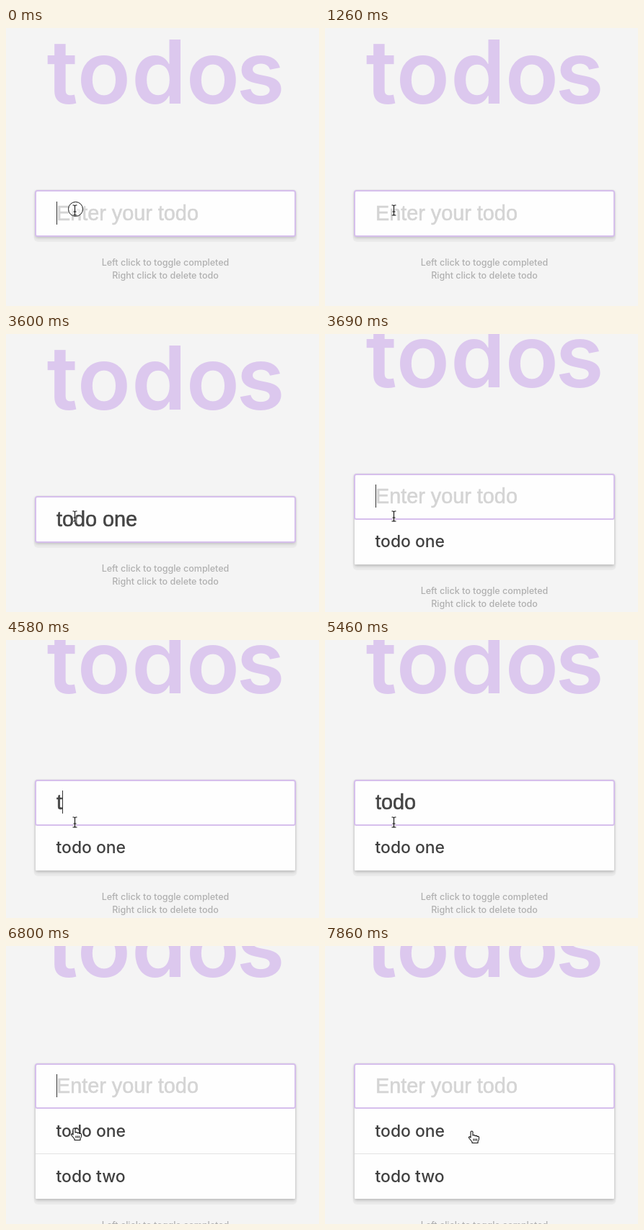
An HTML page that plays this animation: 434 by 386 pixels, repeating every 8000 ms.

```html
<!DOCTYPE html>
<html lang="en">
<head>
<meta charset="utf-8">
<title>todos</title>
<style>
  html, body { margin: 0; width: 100%; height: 100%; overflow: hidden; background: #f4f4f4; }
  svg { display: block; width: 434px; height: 386px; }
  text { font-family: Inter, "Open Sans", sans-serif; white-space: pre; }
  .title { font-size: 122px; font-weight: 600; fill: #dcc8ee; text-anchor: middle; }
  .halo { fill: #000; fill-opacity: .035; }
  .card { fill: #fefefe; filter: drop-shadow(0 2px 2px rgba(0, 0, 0, .22)); }
  .field { fill: #fefefe; stroke: #d6bfec; stroke-width: 2; }
  .entry { font-family: "Liberation Sans", Arial, sans-serif; font-size: 28.8px; stroke-width: .6px; }
  .item { font-size: 22.9px; font-weight: 500; fill: #404040; }
  .hint { font-size: 12.5px; font-weight: 500; fill: #b0b0b0; text-anchor: middle; }
  .divider { stroke: #e2e2e2; }
</style>
</head>
<body>
<svg viewBox="0 0 434 386">
  <defs>
    <path id="beam" d="M92.500 246H94q1.500 0 1.500 1.500V258.500q0 1.500-1.500 1.500H92.500M98.500 246H97q-1.500 0-1.500 1.500V258.500q0 1.500 1.500 1.500H98.500M93.500 255H97.500" fill="none"/>
  </defs>
  <rect width="434" height="386" fill="#f4f4f4"/>
  <text id="title" class="title" x="78 136 212 287 353" y="104.500">todos</text>

  <rect id="halo" class="halo" x="39" width="364" rx="5"/>
  <rect id="card" class="card" x="41" width="360" rx="1"/>
  <text id="item0" class="item" x="69.500">todo one</text>
  <text id="item1" class="item" x="69.500">todo two</text>
  <path id="divider" class="divider" d="M41 288.500H401"/>
  <rect id="field" class="field" x="41" width="360" rx="2.500"/>
  <text id="entry" class="entry" x="70"></text>
  <rect id="caret" width="1" height="32" fill="#333"/>

  <g id="hints" class="hint">
    <text x="221" y="330">Left click to toggle completed</text>
    <text x="221" y="348">Right click to delete todo</text>
  </g>

  <circle id="ring" cx="96.500" cy="251.500" r="10" fill="#fff" fill-opacity=".55" stroke="#111"/>
  <g id="textCursor">
    <use href="#beam" stroke="#fff" stroke-width="2.600" stroke-opacity=".8"/>
    <use href="#beam" stroke="#111" stroke-width="1.100"/>
  </g>
  <g id="hand" stroke="#111" stroke-width="1.100" stroke-linejoin="round">
    <path fill="#fff" d="M-1.500 9V1.500a1.500 1.500 0 0 1 3 0V6q2.500-1.300 3 .8q2.500-1.200 3 .8q2.500-.8 2.500 1.500q.3 3-1.500 5.400V16.500H.5V15Q-1 13-4 9.500Q-4.500 7.500-2.500 8Z"/>
    <path d="M2.500 10.500V13.500M4.700 10.500V13.500M6.900 10.500V13.500"/>
  </g>
</svg>
<script>
  const LOOP = 8000;
  const PLACEHOLDER = 'Enter your todo';

  // [start time, typed text, caret visible]
  const typing = [
    [0, '', 1], [270, '', 0], [720, '', 1], [1260, '', 0],
    [1350, 't', 1], [1620, 'to', 1], [1890, 'tod', 1], [1980, 'todo', 1],
    [2340, 'todo ', 1], [2700, 'todo o', 1], [3060, 'todo on', 1],
    [3150, 'todo one', 1], [3600, 'todo one', 0],
    [3690, '', 1], [4130, '', 0],
    [4580, 't', 1], [4660, 'to', 1], [4930, 'tod', 1], [5020, 'todo', 1],
    [5460, 'todo', 0], [5550, 'todo ', 1], [6000, 'todo t', 1],
    [6170, 'todo tw', 1], [6350, 'todo two', 1],
    [6800, '', 1], [7330, '', 0]
  ];
  // [start time, number of items]
  const counts = [[0, 0], [3690, 1], [6800, 2]];
  // [start time, fingertip x, fingertip y]
  const pointing = [
    [6800, 94.5, 253], [7330, 97, 262], [7420, 118, 286], [7510, 162, 308],
    [7600, 228, 315], [7680, 290, 300], [7770, 258, 272], [7860, 203.5, 257]
  ];

  const $ = id => document.getElementById(id);
  const current = (steps, t) => steps.findLast(step => step[0] <= t);
  const show = (id, on) => $(id).style.display = on ? '' : 'none';
  const set = (id, attrs) => {
    for (const name in attrs) $(id).setAttribute(name, attrs[name]);
  };
  const shiftY = (id, y) => set(id, { transform: `translate(0 ${y})` });

  function layout(count) {
    const shift = 31 * count;
    shiftY('title', -shift);
    shiftY('hints', shift);
    set('halo', { y: 224 - shift, height: 73 + 2 * shift });
    set('card', { y: 226 - shift, height: 63 + 2 * shift });
    set('field', { y: 226 - shift, height: 63 - count });
    for (const i of [0, 1]) {
      set('item' + i, { y: 327 - shift + 63 * i });
      show('item' + i, i < count);
    }
    show('divider', count === 2);
  }

  function enter(text, caretOn, count) {
    const entry = $('entry');
    const color = text ? '#444' : '#d4d4d4';
    entry.textContent = text || PLACEHOLDER;
    set('entry', { y: 266.5 - 31.5 * count, fill: color, stroke: color });
    const width = text ? entry.getComputedTextLength() : 0;
    set('caret', { x: 70 + Math.floor(width), y: 241 - Math.ceil(31.5 * count) });
    show('caret', caretOn);
  }

  function draw(t) {
    const count = current(counts, t)[1];
    const [, text, caretOn] = current(typing, t);
    const hand = current(pointing, t);
    layout(count);
    enter(text, caretOn, count);
    show('ring', t < 90);
    show('textCursor', !hand);
    show('hand', hand);
    if (hand) set('hand', { transform: `translate(${hand[1]} ${hand[2]})` });
  }

  const start = performance.now();
  function tick() {
    draw((performance.now() - start) % LOOP);
    requestAnimationFrame(tick);
  }
  tick();
</script>
</body>
</html>
```
